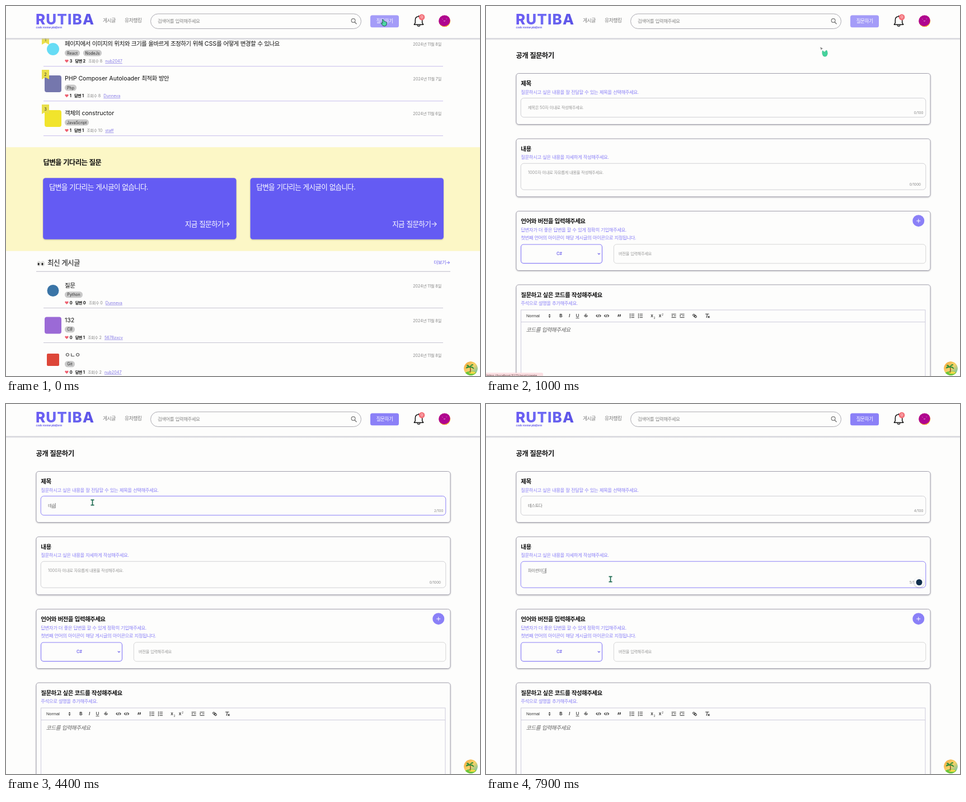
An HTML page for the animation above (8 s loop, 847x661 px).

```html
<!DOCTYPE html>
<html lang="ko">
<head>
<meta charset="utf-8">
<title>Code review board</title>
<style>
html, body { margin: 0; width: 100%; height: 100%; overflow: hidden; background: #fdfdfc; }
svg { display: block; width: 100vw; height: 100vh; }
text { font-family: Inter, "Noto Sans CJK KR", "Noto Sans CJK", sans-serif; white-space: pre; }
.k { letter-spacing: -.056em; }
.u { text-decoration: underline; }
.shade { filter: drop-shadow(0 1.5px 1.2px rgba(60, 60, 70, .32)); }
</style>
</head>
<body>
<svg id="stage" viewBox="0 0 847 661" xmlns="http://www.w3.org/2000/svg"></svg>
<script>
const VIOLET = '#8b80f7', INK = '#111', BG = '#fdfdfc';
const BOLD = 'font-weight="700"', SEMI = 'font-weight="600"', MED = 'font-weight="500"';
const MID = 'text-anchor="middle"', END = 'text-anchor="end"';

// Markup helpers
const hangul = s => s.replace(/[ㄱ-ㅣ가-힣]+/g, m => `<tspan class="k">${m}</tspan>`);
const text = (x, y, s, size, fill = INK, extra = '') =>
  `<text x="${x}" y="${y}" font-size="${size}" fill="${fill}" ${extra}>${hangul(s)}</text>`;
const rect = (x, y, w, h, r, fill, extra = '') =>
  `<rect x="${x}" y="${y}" width="${w}" height="${h}" rx="${r}" fill="${fill}" ${extra}/>`;
const circle = (x, y, r, fill, extra = '') => `<circle cx="${x}" cy="${y}" r="${r}" fill="${fill}" ${extra}/>`;
const path = (d, stroke, w = 1, fill = 'none', extra = '') =>
  `<path d="${d}" fill="${fill}" stroke="${stroke}" stroke-width="${w}" ${extra}/>`;
const box = (x, y, w, h, r, stroke, extra = '') => rect(x, y, w, h, r, BG, `stroke="${stroke}" ${extra}`);
const group = (id, body, extra = '') => `<g id="${id}" ${extra}>${body}</g>`;

const defs = `<defs>
  <linearGradient id="brand"><stop stop-color="#6a5af2"/><stop offset=".5" stop-color="#6f6cf4"/><stop offset="1" stop-color="#5a50e6"/></linearGradient>
  <linearGradient id="under" x2="0" y2="1"><stop stop-color="#bcbcc6"/><stop offset="1" stop-color="#bcbcc6" stop-opacity="0"/></linearGradient>
  <linearGradient id="sky" x2="1" y2="1"><stop stop-color="#f6a53c"/><stop offset=".5" stop-color="#f7d36a"/><stop offset="1" stop-color="#46bfae"/></linearGradient>
  <clipPath id="face"><circle cx="783.7" cy="27" r="10.5"/></clipPath>
  <clipPath id="isle"><circle cx="830.5" cy="647.5" r="12.5"/></clipPath>
</defs>`;

function header() {
  return rect(0, 57, 847, 4, 0, 'url(#under)') + rect(0, 0, 847, 57.5, 0, BG) +
    text(53, 32.5, 'RUTIBA', 26, 'url(#brand)', 'font-weight="800" letter-spacing="1.1"') +
    text(53.5, 39.5, 'code review platform', 4.5, '#6257ea', 'font-weight="700" font-style="italic"') +
    text(173, 29, '게시글', 8.8, '#777') + text(212, 29, '유저랭킹', 8.8, '#777') +
    box(258.5, 14, 376, 26.5, 13.2, '#aaa9b0') + text(271, 30.2, '검색어를 입력해주세요', 8.45, '#858585') +
    circle(620.6, 26, 3.4, 'none', 'stroke="#777" stroke-width="1.2"') + path('M623 28.6l3.5 3.6', '#777', 1.4) +
    rect(651, 16.5, 51, 21.8, 3.5, VIOLET, 'id="ask"') + text(676.5, 30.4, '질문하기', 8.6, '#fff', MID + MED) +
    path('M729.3 33.2h16.4l-2-3v-5c0-4-2.400-6.400-6.200-6.400s-6.200 2.400-6.200 6.400v5zM735 34.500c.5 2 4.500 2 5 0M737.500 18.500v-1.500', INK, 1.5, 'none', 'stroke-linejoin="round"') +
    circle(743, 20, 5.4, '#f3727a') + text(743, 22.4, '0', 6.6, '#fff', MID) +
    `<g clip-path="url(#face)">${circle(783.7, 27, 10.5, '#f5a32d')}${circle(783, 25.6, 10.6, '#b0058f')}</g>` +
    path('M779.500 23.500h1M786.500 23h1M782 26.500q1.500 1.200 3-.2', '#f3cdea', .8);
}

const ribbon = (y, n) => path(`M64 ${y}h13v17l-6.500-3.500-6.500 3.500z`, 'none', 0, '#e9df4c') +
  text(70.5, y + 11, n, 7.2, '#333', MID);

// One list entry; y is the title baseline
function row(y, icon, title, tags, [likes, answers, views], user, date, line) {
  let x = 105, out = icon + text(105, y, title, 10.6);
  for (const [name, w] of tags) {
    out += rect(x, y + 7.5, w, 11, 5.2, '#c9c9c9') + text(x + w / 2, y + 15.6, name, 7.1, '#333', MID);
    x += w + 6;
  }
  const h = y + 25.2;
  out += path(`M108.500 ${h + 5}l-2.700-2.800c-1.600-2 1.200-4 2.700-1.800c1.500-2.200 4.300-.2 2.700 1.800z`, 'none', 0, '#ee6070');
  out += `<text x="113.800" y="${y + 30}" font-size="7.2" fill="${INK}"><tspan ${BOLD}>${likes}</tspan>` +
    `<tspan dx="5" ${BOLD}>${hangul('답변 ' + answers)}</tspan><tspan dx="5" fill="#888">${hangul('조회수 ' + views)}</tspan>` +
    `<tspan dx="5" fill="#8377e6" class="u">${user}</tspan></text>`;
  return out + text(778, y, date, 7.2, '#888', END) + path(`M67 ${y + 36.7}h714`, line, 1.1);
}

function board() {
  const tile = (y, fill) => rect(69, y, 30, 30, 4, fill);
  const waiting = x => rect(x, 307.3, 345.3, 109.500, 4.500, '#645bf3', 'class="shade"') +
    text(x + 10.7, 328.3, '답변을 기다리는 게시글이 없습니다.', 12.6, '#fff') +
    text(x + 334.5, 393.6, '지금 질문하기→', 12.6, '#fff', END);
  const top = '#c6bcec', low = '#c6c4d2', d8 = '2024년 11월 8일';
  const eye = x => `<ellipse cx="${x}" cy="460.300" rx="3" ry="4.300" fill="#e9e9e6" stroke="#bbb" stroke-width=".5"/>` +
    `<ellipse cx="${x - .6}" cy="461" rx="1.500" ry="2.200" fill="#222"/>`;
  return rect(0, 252.3, 847, 185.4, 0, '#fcf7c6') +
    row(71, circle(84, 77, 11, '#66dcf5') + ribbon(52, '1'), '페이지에서 이미지의 위치와 크기를 올바르게 조정하기 위해 CSS를 어떻게 변경할 수 있나요',
      [['React', 27], ['NodeJs', 33]], [3, 2, 8], 'nub2047', d8, top) +
    row(133, tile(124, '#7577ad') + ribbon(114, '2'), 'PHP Composer Autoloader 최적화 방안', [['Php', 21]], [1, 1, 8], 'Dunneva', '2024년 11월 7일', top) +
    row(195, tile(186, '#f1e42c') + ribbon(176, '3'), '객체의 constructor', [['JavaScript', 43]], [1, 1, 10], 'staff', '2024년 11월 6일', top) +
    text(66.5, 284, '답변을 기다리는 질문', 12.5, INK, SEMI) + waiting(66.2) + waiting(436.6) +
    eye(58.8) + eye(65.6) + text(74, 463.2, '최신 게시글', 12.6, INK, MED) +
    text(794, 461.3, '더보기→', 8.3, '#6f64ee', END + MED) + path('M54 474.200h740', '#bcbac6', 1.1) +
    row(502.8, circle(84, 508.5, 10.5, '#3a74a6'), '질문', [['Python', 32]], [0, 0, 0], 'Dunneva', d8, low) +
    row(564.8, tile(555.5, '#9b6ad6'), '132', [['C#', 18]], [0, 1, 2], '5678zxcv', d8, low) +
    row(626.8, rect(73, 621, 22, 22, 2, '#dd4638'), 'ㅇㄴㅇ', [['Git', 18]], [0, 1, 2], 'nub2047', d8, low);
}

function toolbar() {
  const c = '#333', mark = (x, s, extra) => text(x, 556.4, s, 8, c, MID + ' ' + extra);
  const lines = (x, from) => path(`M${x - 4} 550.500h8M${x + from} 553.500h${4 - from}M${x - 4} 556.500h8`, c, 1.1);
  const list = x => path(`M${x - 1.500} 550.500h5.500M${x - 1.500} 553.500h5.500M${x - 1.500} 556.500h5.500`, c, 1.1) +
    path(`M${x - 3.500} 549.500v8`, c, 1.3, 'none', 'stroke-dasharray="2 1"');
  const code = x => path(`M${x - 2} 551.500l-2 2 2 2M${x + 2} 551.500l2 2-2 2M${x + .7} 551l-1.400 5`, c, 1.1);
  const script = (x, s, y) => mark(x - 1.5, 'x', SEMI) + text(x + 3, y, s, 5, c, MID);
  return text(72, 556.2, 'Normal', 7.45, c, 'style="font-family:Liberation Sans,sans-serif"') +
    path('M111.500 552.800l2-2.600 2 2.600zM111.500 554.300l2 2.600 2-2.600z', 'none', 0, c) +
    mark(134, 'B', BOLD) + mark(149, 'I', SEMI + ' font-style="italic" font-family="serif"') +
    mark(163.5, 'U', MED + ' class="u"') + mark(178.5, 'S', MED) + path('M175 553.600h7', c, 1) +
    code(201) + code(215.5) + text(238, 561.5, '”', 14, c, MID + ' ' + BOLD) + list(261) + list(276) +
    script(298, '2', 558.5) + script(312.5, '2', 553) +
    lines(335.5, 0) + path('M333.500 551.800v3.400l-2-1.700z', 'none', 0, c) +
    lines(350.5, 0) + path('M346.500 551.800v3.400l2-1.700z', 'none', 0, c) +
    `<g transform="rotate(40 373 553.500)">${rect(369.2, 552, 4.4, 3.2, 1.6, 'none', `stroke="${c}" stroke-width="1.100"`)}${rect(372.4, 552, 4.4, 3.2, 1.6, 'none', `stroke="${c}" stroke-width="1.100"`)}</g>` +
    path('M392 550.200h6.500M395.500 550.200l-1.500 6.800M396.500 554l3 3.200M399.500 554l-3 3.200', c, 1.1);
}

function form() {
  const card = (y, h) => box(54, y, 740, h, 4.5, '#a3a1ae', 'class="shade"');
  const title = (y, s) => text(62.3, y, s, 10.6, INK, SEMI);
  const note = (y, s) => text(62.3, y, s, 8.43, VIOLET);
  const field = (id, y, h) => box(62.2, y, 723.6, h, 5.5, '#d0d0d4', `id="${id}Box"`) + group(id, '');
  return text(53.5, 92.6, '공개 질문하기', 12.5, INK, SEMI) +
    card(120.5, 91) + title(142, '제목') + note(156.8, '질문하시고 싶은 내용을 잘 전달할 수 있는 제목을 선택해주세요.') + field('subject', 164.5, 34.2) +
    card(237.2, 103.6) + title(258.8, '내용') + note(273.4, '질문하시고 싶은 내용을 자세하게 작성해주세요.') + field('body', 281.2, 47) +
    group('helper', circle(774, 318.5, 9, '#fff', 'class="shade"') + circle(774, 318.5, 5.5, '#12304d')) +
    card(366.5, 106) + title(388, '언어와 버전을 입력해주세요') +
    note(402.8, '답변자가 더 좋은 답변을 할 수 있게 정확히 기입해주세요.') + note(417.4, '첫번째 언어의 아이콘이 해당 게시글의 아이콘으로 지정됩니다.') +
    circle(772.8, 383.7, 10.5, VIOLET) + path('M769.300 383.900h7M772.800 380.400v7', '#fff', 1) +
    box(62.5, 426, 145, 33.6, 4.5, VIOLET, 'stroke-width="1.200"') + text(131, 445.2, 'C#', 7.3, '#7468ee', MID + ' ' + SEMI) +
    path('M199.800 441.600l2 2 2-2', '#6c60e8', 1.2) +
    box(228.3, 425.8, 557.5, 34, 5, '#d6d6d6') + text(237, 445, '버전을 입력해주세요', 7.3, '#999') +
    card(498, 190) + title(519.8, '질문하고 싶은 코드를 작성해주세요') + note(534.4, '주석으로 설명을 추가해주세요.') +
    box(62.5, 543, 722.5, 140, 0, '#cdcbdc') + path('M62.500 564.500h722.500', '#cdcbdc') + toolbar() +
    text(71.5, 582.2, '코드를 입력해주세요', 9.8, '#666', 'font-style="italic"');
}

const island = `<g clip-path="url(#isle)">${circle(830.5, 647.5, 12.5, 'url(#sky)')}` +
  '<ellipse cx="831" cy="660" rx="14" ry="7.500" fill="#6cc53a"/><ellipse cx="833" cy="655" rx="6" ry="2" fill="#f4da4a"/>' +
  path('M829 655q2-6 0-10', '#8a5a2b', 1.6) + path('M829 645q-5-3-7 2q4-1 7-2q-3-5-6-3q3 1 6 3q2-6 6-4q-4 1-6 4q5-2 7 3q-3-2-7-3z', '#2f8f3a', 1, '#2f8f3a') + '</g>';

const status = rect(-2, 655.3, 104, 10, 2, '#fbdfe2') +
  text(1, 662, 'https://localhost:5173/post/create', 5.85, '#6b4448', 'style="font-family:Roboto,sans-serif"');

const pointers =
  group('arrow', path('M0 0l5.500 3.200-2.600.8-1 2.600z', '#fff', .4, '#777') +
    path('M4 8q.5-2.500 2 0l.8 1.500q1-2 2 0l1.200-2.500q2-2 2.600.8q1.800 5-1 8.400q-3 2.200-6 0q-2.400-3.500-1.600-8.200z', '#2fb583', .6, '#45d39c')) +
  group('hand', path('M-2.500-5.500q1.300-1.200 2 .3l1 3q1.200-1 1.800.2q1.300-.6 1.700.6q1.600 0 1.300 2l-.8 4q-3 2.400-6 .6l-3-4q-.4-1.700 1.200-1.200l1.300 1z', '#164f43', .9, '#4fd8a6')) +
  group('beam', path('M-3-4.700h6M-3 4.700h6M0-4.700v9.400', '#1d6a50', 1.7));

const stage = document.getElementById('stage');
stage.innerHTML = defs + group('board', board()) + group('form', form()) + header() +
  island + group('status', status) + pointers;
const $ = id => document.getElementById(id);
const show = (id, on) => $(id).setAttribute('display', on ? 'inline' : 'none');

// Timeline
const LOOP = 8000, OPEN = 1000, FOCUS_SUBJECT = 1700, FOCUS_BODY = 6300;
const route = [[0, 675, 30], [900, 675, 30], [1000, 597, 73], [1350, 300, 150], [1700, 145, 180], [2300, 145, 180],
  [3200, 154.5, 176], [5600, 154.5, 176], [5700, 185, 163], [6200, 212, 298], [6500, 218, 308], [6800, 218, 308], [7300, 222.5, 313]];
const keysSubject = [[2400, 'w'], [2700, 'wl'], [3100, 'wlf'], [3400, 'wl'], [3500, 'w'], [3600, ''], [3800, 'ㅌ'], [4000, '테'],
  [4100, '텟'], [4300, '테스'], [4400, '테슽'], [4700, '테스트'], [5000, '테스틷'], [5200, '테스트다']];
const keysBody = [[6700, 'ㅍ'], [6900, '파'], [7100, '팡'], [7300, '파이'], [7500, '파있'], [7600, '파이써'],
  [7700, '파이썬'], [7800, '파이썬이'], [7900, '파이썬이다']];

function pointerAt(t) {
  const i = route.findIndex(p => p[0] > t);
  if (i < 0) return route[route.length - 1].slice(1);
  const [t0, x0, y0] = route[i - 1], [t1, x1, y1] = route[i], k = (t - t0) / (t1 - t0);
  return [x0 + (x1 - x0) * k, y0 + (y1 - y0) * k];
}

function drawField(id, t, keys, focusTime, focused, y, hint, limit, countX, countY) {
  const [since, value] = keys.filter(k => k[0] <= t).pop() || [focusTime, ''];
  const composing = focused && /[ㄱ-힣]$/.test(value);
  const g = $(id);
  g.innerHTML = text(75, y, value || hint, 7.35, value ? '#777' : '#999') +
    text(countX, countY, `${value.length}/${limit}`, 6.2, '#888', END);
  const width = value ? g.firstChild.getComputedTextLength() : 0;
  if (composing) g.innerHTML += path(`M${75 + width - 6.2} ${y + 1.8}h6.200`, '#777', .7);
  if (focused && Math.floor((t - since) / 500) % 2 === 0)
    g.innerHTML += path(`M${75.4 + width} ${y - 7}v9`, '#555', .8);
  $(id + 'Box').setAttribute('stroke', focused ? VIOLET : '#d0d0d4');
}

function render(now) {
  const t = Math.floor(now % LOOP / 100) * 100;
  const opened = t >= OPEN;
  show('board', !opened);
  show('form', opened);
  show('status', t >= 400 && t < 1700);

  const fade = Math.min(1, Math.max(0, (t - OPEN) / 300));
  $('ask').setAttribute('fill', `rgb(${[[164, 139], [156, 128], [248, 247]].map(([a, b]) => Math.round(a + (b - a) * fade))})`);

  if (opened) {
    drawField('subject', t, keysSubject, FOCUS_SUBJECT, t >= FOCUS_SUBJECT && t < FOCUS_BODY, 184, '제목은 50자 이내로 작성해주세요.', 100, 781.3, 193);
    drawField('body', t, keysBody, FOCUS_BODY, t >= FOCUS_BODY, 300.2, '1000자 이내로 자유롭게 내용을 작성해주세요.', 1000, 777, 320.6);
    show('helper', t >= FOCUS_BODY + 100);
  }

  const [x, y] = pointerAt(t);
  const inField = opened && x > 62 && x < 786 && ((y > 164.5 && y < 199) || (y > 281 && y < 328));
  const kind = !opened ? 'hand' : inField ? 'beam' : 'arrow';
  for (const id of ['hand', 'beam', 'arrow']) show(id, id === kind);
  $(kind).setAttribute('transform', `translate(${x} ${y})`);
}

const start = performance.now();
function loop() {
  render(performance.now() - start);
  requestAnimationFrame(loop);
}
loop();
</script>
</body>
</html>
```
